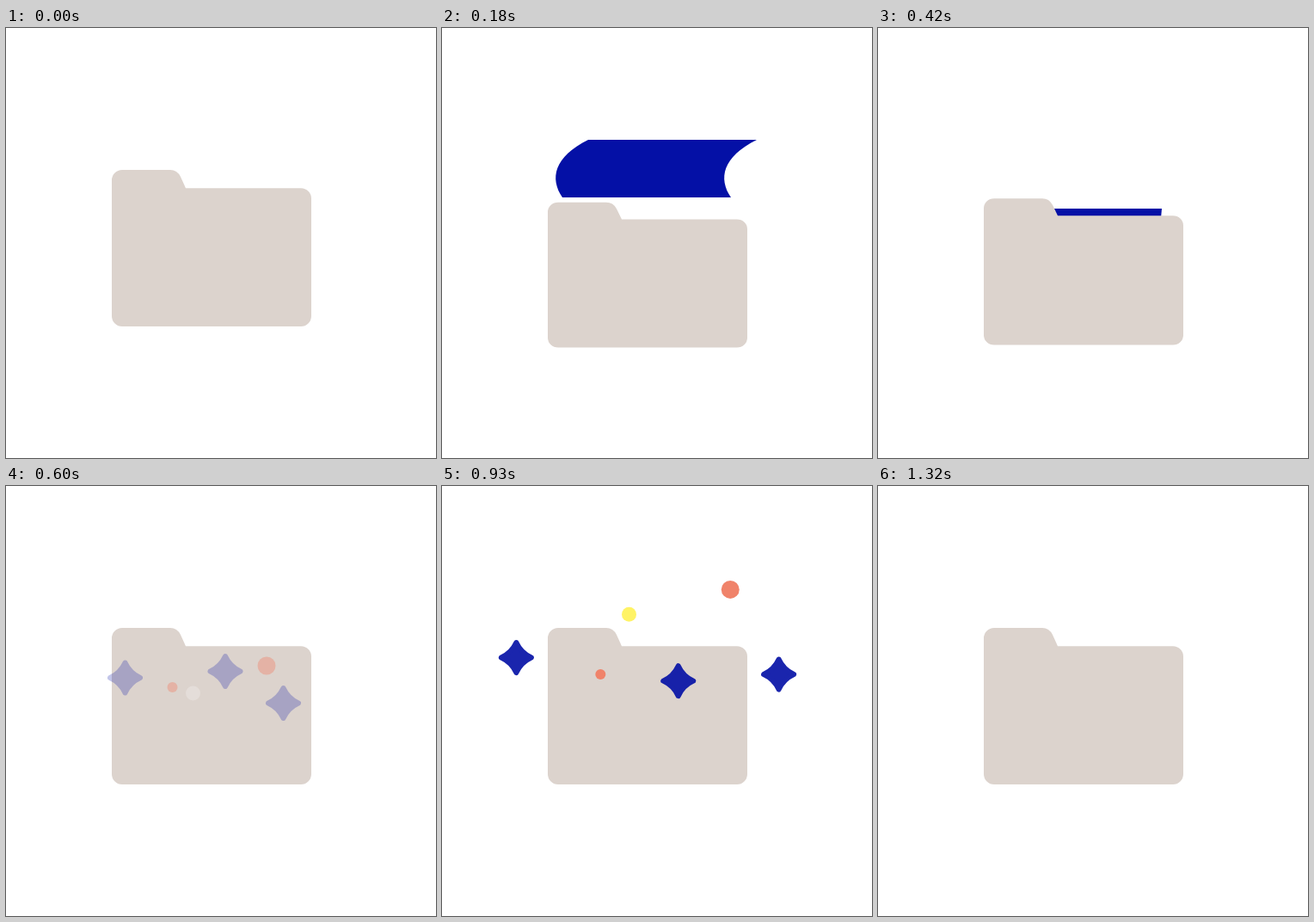
Write an HTML page that moves like this. It is 500 px wide and 500 px high and loops after 1.35 s.

```html
<!DOCTYPE html>
<html lang="en">
<head>
<meta charset="utf-8">
<title>Folder</title>
<style>
  html, body { margin: 0; width: 100%; height: 100%; overflow: hidden; background: #fff; }
  svg { display: block; width: 100%; height: 100%; }
</style>
</head>
<body>
<svg viewBox="0 0 500 500" xmlns="http://www.w3.org/2000/svg">
  <path id="sheet" fill="#0410a6"/>
  <path id="folder" fill="#dcd3cd" d="M123 177a12 12 0 0 1 12-12H191Q199 165 203 173L209 186.300H343a12 12 0 0 1 12 12V335a12 12 0 0 1-12 12H135a12 12 0 0 1-12-12Z"/>
  <g id="bits"></g>
</svg>
<script>
const LOOP = 1350, STEP = 30;
const SHEET_W = 196;
const BLUE = '#0410a6', SALMON = '#f0836a', YELLOW = '#fff254';
const STAR = 'M0-17.500Q5.500-5.500 17.500 0Q5.500 5.500 0 17.500Q-5.500 5.500-17.500 0Q-5.500-5.500 0-17.500Z';

const clamp = x => Math.min(1, Math.max(0, x));
const ease = x => { x = clamp(x); return x * x * (3 - 2 * x); };

// Monotone cubic interpolation; each key is [time, ...values]
function track(keys, t) {
  const last = keys.length - 1;
  if (t <= keys[0][0]) return keys[0].slice(1);
  if (t >= keys[last][0]) return keys[last].slice(1);
  let i = 0;
  while (t >= keys[i + 1][0]) i++;
  const a = keys[i], b = keys[i + 1], h = b[0] - a[0], u = (t - a[0]) / h;
  const slope = (j, c) => (keys[j + 1][c] - keys[j][c]) / (keys[j + 1][0] - keys[j][0]);
  const tangent = (j, c) => {
    if (j === 0) return slope(0, c);
    if (j === last) return 0;
    const p = slope(j - 1, c), q = slope(j, c);
    return p * q <= 0 ? 0 : 2 * p * q / (p + q);
  };
  return a.slice(1).map((v, n) => {
    const c = n + 1, w = b[c];
    return v + (w - v) * u * u * (3 - 2 * u)
      + h * u * (1 - u) * ((1 - u) * tangent(i, c) - u * tangent(i + 1, c));
  });
}

// Left edge of the sheet as a cubic: top, two controls, bottom
const sheetKeys = [
  [30, 259, 56, 257, 58, 256, 60, 255, 63],
  [90, 236, 74, 204, 88, 180, 108, 178, 132],
  [180, 170, 130, 130, 150, 125, 175, 140, 197],
  [300, 142, 188, 128, 212, 128, 240, 134, 275],
  [420, 134, 210, 132, 230, 131, 260, 130, 300],
  [540, 134, 225, 132, 250, 131, 280, 130, 310]
];

const parts = [
  { fill: BLUE, start: .24, out: [900, 1230],
    keys: [[570, 145, 227], [600, 138.5, 223], [810, 97, 201], [1050, 81.5, 199], [1320, 81.3, 199]] },
  { fill: BLUE, start: .24, out: [900, 1230],
    keys: [[570, 252, 223], [600, 255, 215.5], [705, 267, 163], [810, 274, 188.5], [1050, 275, 251.5], [1320, 275, 256]] },
  { fill: BLUE, start: .24, out: [900, 1230],
    keys: [[570, 314, 252.5], [600, 322.5, 252.5], [810, 373.5, 226.5], [1050, 400.5, 215.5], [1320, 400, 215]] },
  { fill: SALMON, r: 10.5, start: .4, out: [960, 1290],
    keys: [[570, 300, 222], [600, 303, 209], [705, 327, 94], [810, 335.5, 114], [1050, 335, 124], [1320, 335, 128]] },
  { fill: SALMON, r: 6, start: .4, out: [1020, 1320],
    keys: [[570, 195, 237], [600, 193.5, 234], [810, 186.5, 220], [1050, 183, 218.5], [1320, 182, 218]] },
  { fill: YELLOW, r: 8.5, start: .24, out: [900, 1200], pale: true,
    keys: [[570, 217.5, 252], [600, 217.5, 241], [715, 217.5, 132], [810, 217.5, 145], [1050, 217.5, 151.5], [1320, 217.5, 154]] }
];

const byId = id => document.getElementById(id);
const sheet = byId('sheet'), folder = byId('folder'), bits = byId('bits');

function set(el, attrs) {
  for (const k in attrs) el.setAttribute(k, attrs[k]);
}

for (const p of parts) {
  p.el = document.createElementNS('http://www.w3.org/2000/svg', p.r ? 'circle' : 'path');
  set(p.el, p.r ? { r: p.r, fill: p.fill } : {
    d: STAR, fill: p.fill, stroke: p.fill, 'stroke-width': 6, 'stroke-linejoin': 'round'
  });
  bits.append(p.el);
}

function drawFolder(t) {
  const k = t < 270 ? ease(t / 270) : 1 - Math.pow(clamp((t - 270) / 270), 1.8);
  const top = 165 + 51 * k, bottom = 347 + 33 * k;
  const s = (bottom - top) / 182;
  set(folder, { transform: `matrix(1 0 0 ${s} 0 ${top - 165 * s})` });
}

function drawSheet(t) {
  const on = t >= 30 && t < 540;
  set(sheet, { visibility: on ? 'visible' : 'hidden' });
  if (!on) return;
  const [x0, y0, x1, y1, x2, y2, x3, y3] = track(sheetKeys, t);
  const w = SHEET_W;
  set(sheet, {
    d: `M${x0} ${y0}C${x1} ${y1} ${x2} ${y2} ${x3} ${y3}H${x3 + w}` +
       `C${x2 + w} ${y2} ${x1 + w} ${y1} ${x0 + w} ${y0}Z`
  });
}

function drawPart(p, t) {
  const [x, y] = track(p.keys, t);
  const [show] = track([[570, 0], [600, p.start], [690, 1]], t);
  const hide = 1 - clamp((t - p.out[0]) / (p.out[1] - p.out[0]));
  set(p.el, { transform: `translate(${x} ${y})`, opacity: show * hide });
  if (p.pale) {
    const m = clamp((t - 600) / 90);
    set(p.el, { fill: `rgb(255 ${255 - 13 * m} ${255 - 171 * m})` });
  }
}

function draw(t) {
  drawFolder(t);
  drawSheet(t);
  parts.forEach(p => drawPart(p, t));
}

let begin;
function tick(now) {
  begin ??= now;
  const t = (now - begin) % LOOP;
  draw(Math.floor((t + .5) / STEP) * STEP % LOOP);
  requestAnimationFrame(tick);
}
draw(0);
requestAnimationFrame(tick);
</script>
</body>
</html>
```
